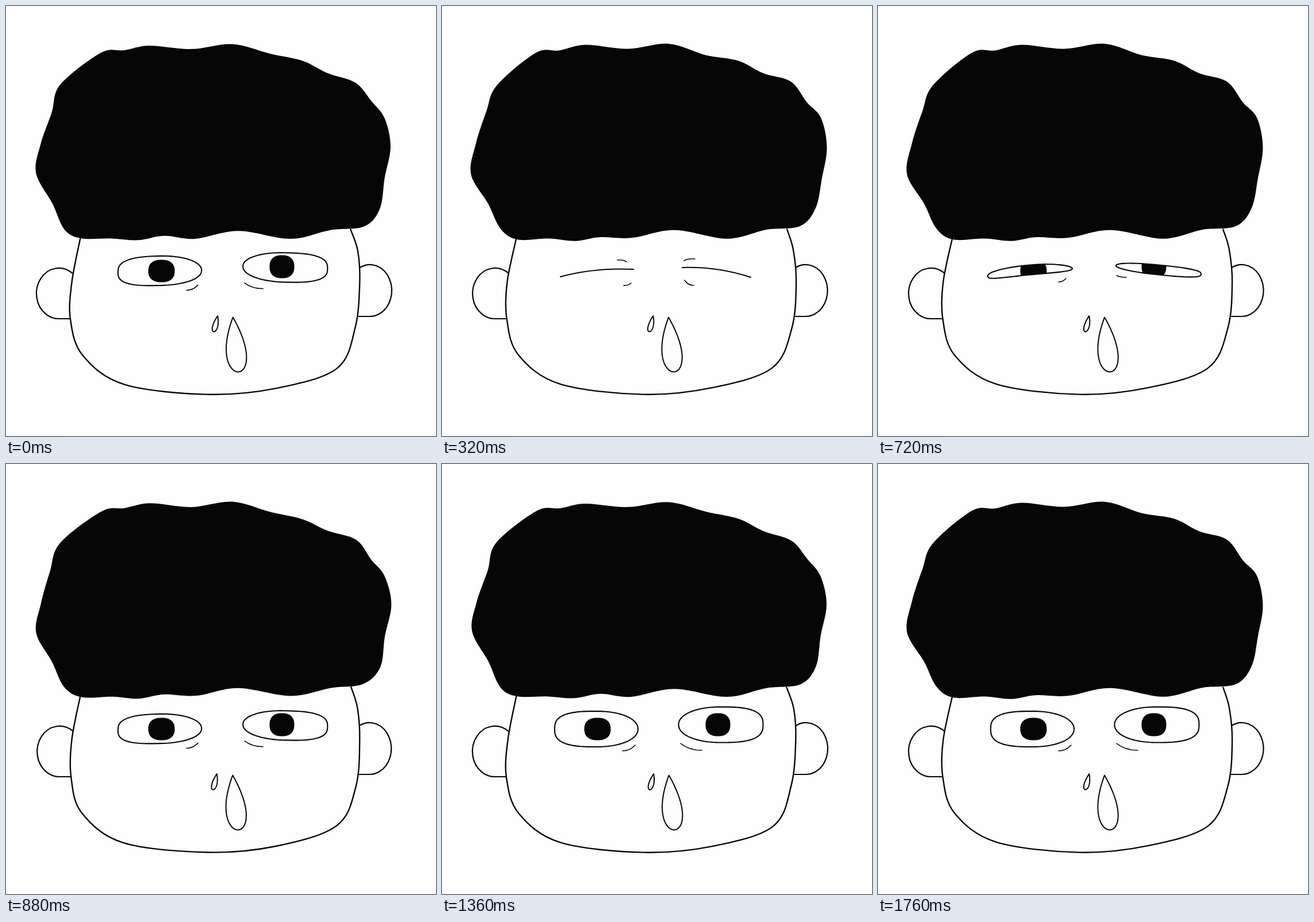
Animation, 748 px wide and 748 px high, one loop 1840 ms. Source, as an HTML page with a canvas:

```html
<!DOCTYPE html>
<html lang="en">
<head>
<meta charset="utf-8">
<title>Blinking head</title>
<style>
  html, body { margin: 0; width: 100%; height: 100%; overflow: hidden; background: #fefefe; }
  canvas { display: block; width: 100vw; height: 100vh; }
</style>
</head>
<body>
<canvas id="stage"></canvas>
<script>
const SIZE = 748, STEP = 80, TAU = Math.PI * 2;
const INK = '#060606', PAPER = '#fefefe';
const DRAWINGS = '02134021340342134021304';  // which wobbly redraw each step shows
const SPECKLED = 1;                          // the redraw with a stray ink speck
const BLINK_MID = 5.5;
const canvas = document.getElementById('stage');
const ctx = canvas.getContext('2d');

// Crests and troughs of the hair, clockwise from the lower left.
const HAIR = [
  [131, 405], [101, 388], [80, 343], [52, 292], [60, 241], [78, 185], [95, 138],
  [165, 82], [205, 78], [250, 69], [322, 76], [395, 67], [460, 84], [515, 95],
  [560, 117], [608, 132], [635, 167], [658, 196], [669, 245], [660, 300],
  [650, 352], [622, 384], [565, 389], [495, 404], [404, 391], [330, 404],
  [275, 401], [232, 408], [185, 404]
];
const JAW = [
  [131, 400], [114, 480], [113, 545], [133, 607], [205, 658], [350, 675],
  [470, 664], [575, 630], [608, 560], [616, 480], [612, 425], [600, 388]
];

// Each eye blends from squinting to wide open; bend curves its centre line.
const EYES = [
  { side: -1, pupil: [270.5, 461, 23, 19.5],
    squint: { cx: 264.5, cy: 459, rx: 73.5, ry: 8.5, slope: -0.09, bend: 0.0008 },
    wide: { cx: 268.5, cy: 461, rx: 72.5, ry: 31, slope: 0, bend: 0 },
    bag: o => [327 + 9 * o, 474 + 15 * o, -13 - 9 * o, 6 + 4 * o] },
  { side: 1, pupil: [480, 453.5, 21.5, 20],
    squint: { cx: 488, cy: 459, rx: 74, ry: 8.5, slope: 0.1, bend: 0 },
    wide: { cx: 485, cy: 453.5, rx: 73.5, ry: 31, slope: 0, bend: 0 },
    bag: o => [415, 469 + 17 * o, 17 + 20 * o, 3 + 9 * o] }
];

// Seeded value in -1..1.
function noise(seed, i) {
  const v = Math.sin(seed * 78.233 + i * 12.9898 + 1) * 43758.5453;
  return 2 * (v - Math.floor(v)) - 1;
}

const wobble = (pts, seed, amount) => pts.map(([x, y], i) =>
  [x + amount * noise(seed, 2 * i), y + amount * noise(seed, 2 * i + 1)]);

const blend = (a, b, k) =>
  Object.fromEntries(Object.keys(a).map(key => [key, a[key] + (b[key] - a[key]) * k]));

// Catmull-Rom curve through points.
function curve(pts, closed) {
  const n = pts.length;
  const at = i => pts[closed ? (i + n) % n : Math.max(0, Math.min(n - 1, i))];
  const path = new Path2D();
  path.moveTo(...pts[0]);
  for (let i = 0; i < (closed ? n : n - 1); i++) {
    const [a, b, c, d] = [at(i - 1), at(i), at(i + 1), at(i + 2)];
    path.bezierCurveTo(
      b[0] + (c[0] - a[0]) / 6, b[1] + (c[1] - a[1]) / 6,
      c[0] - (d[0] - b[0]) / 6, c[1] - (d[1] - b[1]) / 6, ...c);
  }
  return path;
}

// Closed path sampled from a function of the angle.
function loop(point, count = 72) {
  const path = new Path2D();
  for (let i = 0; i < count; i++) path.lineTo(...point(i / count * TAU));
  path.closePath();
  return path;
}

// Unit superellipse; a larger power is squarer.
function squircle(t, power) {
  const c = Math.cos(t), s = Math.sin(t);
  const soft = v => Math.sign(v) * Math.abs(v) ** (2 / power);
  return [soft(c), soft(s)];
}

function stroke(path, width) {
  ctx.lineWidth = width;
  ctx.stroke(path);
}

function arc(x0, y0, cx, cy, x1, y1, width = 1.6) {
  const path = new Path2D();
  path.moveTo(x0, y0);
  path.quadraticCurveTo(cx, cy, x1, y1);
  stroke(path, width);
}

// Teardrop hanging from its tip and leaning sideways.
function tear(x, y, width, height, lean) {
  stroke(loop(t => {
    const down = (1 - Math.cos(t)) / 2;
    return [x + lean * down + width * Math.sin(t) * Math.sin(t / 2), y + height * down];
  }), 2);
}

function ear(cx, cy, rx, ry, side, topAngle) {
  const path = new Path2D();
  const from = side < 0 ? -topAngle : topAngle - Math.PI;
  path.ellipse(cx, cy, rx, ry, 0, from, Math.PI / 2, side < 0);
  path.lineTo(cx - side * 20, cy + ry);
  stroke(path, 2.2);
}

function eye({ side, pupil, squint, wide, bag }, open) {
  const e = blend(squint, wide, open);
  const outline = loop(t => {
    const [u, v] = squircle(t, Math.cos(t) * side > 0 ? 2.8 : 2.1);
    const dx = u * e.rx;
    return [e.cx + dx, e.cy + v * e.ry + e.slope * dx + e.bend * dx * dx];
  });
  const [px, py, rx, ry] = pupil;
  ctx.save();
  ctx.clip(outline);
  ctx.fill(loop(t => {
    const [u, v] = squircle(t, 2.4);
    return [px + rx * u, py + ry * v];
  }));
  ctx.restore();
  stroke(outline, 2.1);
  const [x, y, w, h] = bag(open);
  arc(x, y, x + w * 0.4, y + h, x + w, y + h);
}

function closedEyes() {
  arc(206, 471, 265, 455, 333, 458, 2.1);
  arc(418, 455, 480, 453, 537, 472, 2.1);
  arc(305, 442, 315, 441, 321, 445);
  arc(421, 443, 428, 439, 440, 440);
  arc(329, 482, 323, 487, 316, 486);
  arc(422, 477, 428, 486, 438, 486);
}

function drawEyes(step) {
  const open = Math.min(1, (Math.abs(step - BLINK_MID) - 3.5) * 0.38);
  if (open < 0) closedEyes();
  else EYES.forEach(e => eye(e, open));
}

function drawHead(seed) {
  const jitter = i => 0.8 * noise(seed, 100 + i);
  ear(92.5 + jitter(0), 500, 39, 44, -1, 0.94);
  ear(633 + jitter(1), 495, 38, 45, 1, 1.11);
  stroke(curve(wobble(JAW, seed + 10, 1), false), 2.4);
  ctx.fill(curve(wobble(HAIR, seed, 1.6), true));
  tear(367.5 + jitter(2), 539, 5.8, 27.5, -6.5);
  tear(394 + jitter(3), 541.5, 22.5, 95, 9);
  if (seed === SPECKLED) ctx.fillRect(426, 720, 1.5, 1.5);
}

function render(now) {
  const step = Math.floor(now / STEP) % DRAWINGS.length;
  const dpr = window.devicePixelRatio || 1;
  const w = Math.round(innerWidth * dpr), h = Math.round(innerHeight * dpr);
  if (canvas.width !== w || canvas.height !== h) {
    canvas.width = w;
    canvas.height = h;
  }
  ctx.setTransform(1, 0, 0, 1, 0, 0);
  ctx.fillStyle = PAPER;
  ctx.fillRect(0, 0, w, h);
  const k = Math.min(w, h) / SIZE;
  ctx.setTransform(k, 0, 0, k, 0, 0);
  ctx.fillStyle = ctx.strokeStyle = INK;
  ctx.lineCap = ctx.lineJoin = 'round';
  drawHead(Number(DRAWINGS[step]));
  drawEyes(step);
}

const start = performance.now();
function tick() {
  render(performance.now() - start);
  requestAnimationFrame(tick);
}
tick();
</script>
</body>
</html>
```
